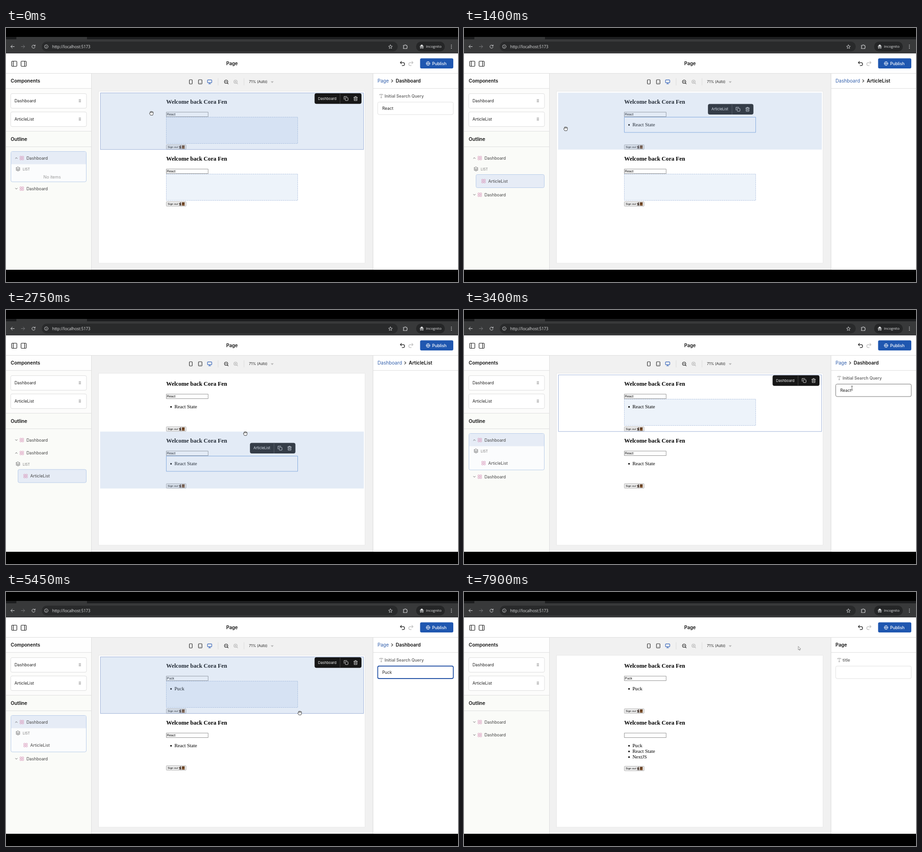
An HTML page with a canvas for the animation above (8.3 s loop, 960x540 px).

```html
<!DOCTYPE html>
<html lang="en">
<head>
<meta charset="utf-8">
<title>Page editor</title>
<style>
html, body { margin: 0; width: 100%; height: 100%; overflow: hidden; background: #000; }
canvas { display: block; }
</style>
</head>
<body>
<canvas id="stage" width="960" height="540"></canvas>
<script>
const ctx = document.getElementById('stage').getContext('2d');
const LOOP = 8300, STEP = 50;
const UI = 'Inter, sans-serif', CHROME = '"Open Sans", sans-serif';
const SERIF = '"Liberation Serif", serif', SANS = '"Liberation Sans", sans-serif';
const BLUE = '#1f57b0', ROW = 121;
const ARTICLES = ['Puck', 'React State', 'NextJS'];

// Cursor way points: time, x, y
const PATH = [
  [0, 309, 181], [250, 95, 200], [300, 89, 205], [550, 400, 226], [600, 414, 222],
  [750, 414, 222], [1100, 410, 216], [1400, 216, 214], [1550, 100, 206], [1650, 89, 205],
  [2050, 380, 347], [2200, 414, 340], [2400, 416, 338], [2600, 416, 338], [2850, 570, 212],
  [3100, 600, 200], [3300, 766, 172], [3400, 824, 166], [5150, 824, 166], [5450, 624, 257],
  [5600, 520, 295], [5650, 520, 295], [5900, 885, 186], [5950, 889, 188], [6050, 889, 188],
  [6200, 815, 171], [7050, 815, 171], [7350, 710, 116], [8300, 710, 116]
];
// Selection: d = dashboard, a = article list, with the row index
const PICKS = [[0, 'd0'], [300, ''], [800, 'a0'], [1650, ''], [2450, 'a1'],
  [2900, 'd0'], [5600, 'd1'], [7350, '']];
const QUERY = [
  [[0, 'React'], [4450, 'P'], [4550, 'Pu'], [4650, 'Puc'], [4750, 'Puck']],
  [[0, 'React'], [6700, '']]
];

const within = (t, a, b) => t >= a && t < b;
const latest = (list, t) => list.filter(k => k[0] <= t).pop()[1];

function cursorAt(t) {
  const i = Math.max(1, PATH.findIndex(p => p[0] > t));
  const [t0, x0, y0] = PATH[i - 1], [t1, x1, y1] = PATH[i];
  const k = (t - t0) / (t1 - t0);
  return { x: x0 + (x1 - x0) * k, y: y0 + (y1 - y0) * k };
}

function text(s, x, cy, size, color = '#222', weight = 400, font = UI) {
  ctx.font = `${weight} ${size}px ${font}`;
  ctx.fillStyle = color;
  ctx.fillText(s, x, cy + size * .36);
  return ctx.measureText(s).width;
}
function fill(x, y, w, h, color) {
  ctx.fillStyle = color;
  ctx.fillRect(x, y, w, h);
}
function box(x, y, w, h, r, bg, edge, lw = 1) {
  ctx.beginPath();
  ctx.roundRect(x, y, w, h, r);
  if (bg) { ctx.fillStyle = bg; ctx.fill(); }
  if (edge) { ctx.strokeStyle = edge; ctx.lineWidth = lw; ctx.stroke(); }
}
function icon(x, y, d, color, lw = 1, bg) {
  const p = new Path2D(d);
  ctx.save();
  ctx.translate(x, y);
  ctx.lineCap = ctx.lineJoin = 'round';
  if (bg) { ctx.fillStyle = bg; ctx.fill(p); }
  ctx.strokeStyle = color;
  ctx.lineWidth = lw;
  ctx.stroke(p);
  ctx.restore();
}
function disc(x, y, r, color) {
  ctx.beginPath();
  ctx.arc(x, y, r, 0, 7);
  ctx.fillStyle = color;
  ctx.fill();
}
const ring = r => `M${r} 0A${r} ${r} 0 1 1 ${-r} 0A${r} ${r} 0 1 1 ${r} 0`;

function browser() {
  fill(0, 0, 960, 540, '#000');
  fill(0, 19, 960, 35, '#38393a');
  fill(172, 19, 788, 5, '#1d1e1f');
  fill(0, 19, 22, 5, '#1d1e1f');
  box(76, 29, 756, 21, 10.5, '#292a2b');
  box(871, 29, 61, 21, 10.5, '#252627');
  icon(14, 39.5, 'M3.7 0H-3.7M-.5-3.3L-3.8 0L-.5 3.3', '#d5d6d8');
  icon(36, 39.5, 'M-3.7 0H3.7M.5-3.3L3.8 0L.5 3.3', '#77787a');
  icon(58.5, 39.5, 'M3 -1.5A3.4 3.4 0 1 0 3.2 1.3M3.4-3.6V-1.3H1', '#d5d6d8');
  icon(85.5, 39.5, ring(3.7) + 'M0 0V1.8M0-1.7V-1.6', '#d5d6d8', .9);
  text('http://localhost:5173', 98, 40, 8.4, '#e0e1e2', 400, CHROME);
  icon(816.5, 39.8, 'M0-4L1.2-1.3L4-1L1.9 .9L2.5 3.7L0 2.2L-2.5 3.7L-1.9 .9L-4-1L-1.2-1.3Z', '#d5d6d8', .9);
  icon(848, 39.8, 'M-4-2.8H-1.3A1.3 1.3 0 0 1 1.3-2.8H3.5V-.8A1.4 1.4 0 0 1 3.5 1.8V4H-4V1.8A1.4 1.4 0 0 0-4-.8Z', '#d5d6d8', 1.1);
  icon(883, 39.5, 'M-4-.5H4M-2.3-1L-1.4-3.5H1.4L2.3-1Z', '#e4e5e6', 1, '#e4e5e6');
  icon(881, 42, ring(1.3), '#e4e5e6', .9);
  icon(885, 42, ring(1.3), '#e4e5e6', .9);
  text('Incognito', 892, 39.7, 7.6, '#e4e5e6', 400, CHROME);
  for (const y of [36.3, 39.6, 42.9]) disc(946, y, .9, '#d5d6d8');
}

function chrome() {
  fill(0, 54, 960, 460, '#fff');
  fill(181, 97, 599, 417, '#f1f1f1');
  fill(0, 97, 181, 417, '#fcfcfb');
  fill(0, 220, 181, 294, '#fafbf8');
  fill(0, 97, 181, 31, '#fefefe');
  fill(0, 96, 960, 1, '#dedede');
  for (const y of [128, 219, 252]) fill(0, y, 181, 1, '#e0e0e0');
  fill(181, 97, 1, 417, '#dedede');
  fill(779, 97, 1, 417, '#dcdcdc');
  fill(780, 128, 180, 1, '#e0e0e0');
  box(196.5, 134.5, 566, 365.5, 0, '#fff', '#e8e8e8');

  for (const [x, d] of [[17.5, -2], [37.5, 2]]) {
    box(x - 5.5, 70.5, 11, 11, 1.5, null, '#222', 1.2);
    icon(x, 76, `M${d}-5.5V5.5`, '#222', 1.2);
  }
  ctx.textAlign = 'center';
  text('Page', 480, 75.3, 10.1, '#111', 600);
  ctx.textAlign = 'left';
  icon(842, 75.5, 'M-2-4.5L-4.6-1.9L-2 .7M-4.6-1.9H1.5A3 3 0 0 1 1.5 4.3H-.8', '#222', 1.2);
  icon(860, 75.5, 'M2-4.5L4.6-1.9L2 .7M4.6-1.9H-1.5A3 3 0 0 0-1.5 4.3H.8', '#bdbdbd', 1.2);
  box(879.5, 64.5, 70.5, 21.5, 3, BLUE);
  icon(896.5, 75.5, ring(4) + 'M-4 0H4M0-4C-2.3-1.5-2.3 1.5 0 4C2.3 1.5 2.3-1.5 0-4', '#fff', .8);
  text('Publish', 905, 75.4, 8.8, '#fff', 500);

  box(389.5, 110, 6, 9, 1.2, null, '#333', 1.2);
  box(408.8, 110, 7.4, 9, 1.2, null, '#333', 1.2);
  icon(412.5, 117, 'M-.4 0H.4', '#333', .9);
  box(428, 110.3, 9, 6, 1, null, '#3a68bd', 1.2);
  icon(432.5, 118.8, 'M-2.2 0H2.2M0-2V0', '#3a68bd', 1.1);
  for (const x of [450, 505]) fill(x, 107, 1, 15, '#dcdcdc');
  for (const [x, c, d] of [[467.5, '#222', ''], [487.5, '#b5b5b5', 'M0-1.6V1.6']])
    icon(x, 114.3, ring(3.5) + 'M2.6 2.6L4.5 4.5M-1.6 0H1.6' + d, c, 1.1);
  text('71% (Auto)', 516, 114.6, 7.6, '#222');
  icon(565.5, 115, 'M-2.5-1.3H2.5L0 1.5Z', '#b5b5b5', .5, '#b5b5b5');

  text('Components', 10, 112.5, 10.1, '#111', 600);
  text('Outline', 10, 236, 10.1, '#111', 600);
  card('Dashboard', 10, 139);
  card('ArticleList', 10, 178);
}

function card(name, x, y, lifted) {
  box(x, y + .5, 161, 31, 3, '#fff', lifted ? '#eeeeee' : '#dedede');
  text(name, x + 8, y + 16, 8.8, '#222');
  for (let i = 0; i < 6; i++)
    disc(x + 145.6 + (i % 2) * 2.5, y + 13.3 + (i >> 1) * 2.4, .75, '#555');
}

function chevron(x, y, up) {
  icon(x, y, up ? 'M-2 1L0-1L2 1' : 'M-2-1L0 1L2-1', '#555', .9);
}
function outlineRow(name, x, y) {
  for (let i = 0; i < 4; i++)
    box(x - 3.8 + (i % 2) * 4.4, y - 3.8 + (i >> 1) * 4.4, 3.2, 3.2, .5, null, '#d793b8', .9);
  text(name, x + 10, y, 8.8, '#444');
}

function outline(pick, lists) {
  let y = 276.5;
  for (let i = 0; i < 2; i++) {
    const open = pick[1] === String(i), on = pick === 'd' + i, full = lists[i];
    const h = open ? (full ? 78 : 65) : 27.5;
    if (on) {
      box(10.5, y - 14, 160, h - .5, 3, '#fbfcfd', '#b9cdea');
      box(11, y - 13.5, 159, 26.5, [3, 3, 0, 0], '#e6ecf6');
    }
    chevron(22, y, open);
    outlineRow('Dashboard', 33.5, y);
    if (open) {
      icon(25.5, y + 23, 'M0-4L4.2-1.8L0 .4L-4.2-1.8ZM-4.2 .4L0 2.6L4.2 .4M-4.2 2.4L0 4.6L4.2 2.4', '#666', .9);
      text('LIST', 35.5, y + 24.2, 7.2, '#777');
      if (full) {
        if (pick[0] === 'a') box(25.5, y + 35, 145, 28, 3, '#e6ecf6', '#b9cdea');
        outlineRow('ArticleList', 41.5, y + 49);
      } else text('No items', 79.5, y + 40.5, 8.8, '#999');
    }
    y += h;
  }
}

function crumbs(parent, name) {
  let x = 789;
  if (parent) {
    x += text(parent, x, 112.5, 10.1, '#3461ad');
    icon(x + 7, 112.5, 'M-1.4-2.6L1.3 0L-1.4 2.6', '#333', 1.2);
    x += 14.5;
  }
  text(name, x, 112.5, 10.1, '#111', 600);
}

function panel(t, pick, query, cur) {
  if (pick[0] === 'a') return crumbs('Dashboard', 'ArticleList');
  crumbs(pick && 'Page', pick ? 'Dashboard' : 'Page');
  icon(797, 144.5, 'M-3.4-2V-3.5H3.4V-2M0-3.5V3.7M-1.4 3.7H1.4', '#999', .9);
  text(pick ? 'Initial Search Query' : 'title', 804, 144.5, 8.8, '#6e6e6e', 600);
  const focus = within(t, 3600, 5600) || within(t, 6200, 7350);
  const edge = focus ? '#2a57a8' : inField(cur) ? '#777' : '#e0e0e0';
  box(789.5, 157.5, 160.5, 26.5, 3, '#fff', edge, focus ? 1.8 : 1);
  if (!pick) return;
  if (within(t, 3800, 4450) || within(t, 6400, 6700)) fill(798, 164, 25, 12, '#b4d2f7');
  text(query[pick[1]], 799, 170.5, 8.8, '#222');
}

const inField = c => c.x > 789 && c.x < 950 && c.y > 157 && c.y < 184;

function signOut(y) {
  box(340.5, y + .5, 42, 9.5, 1, '#efefef', '#a9a9a9', .9);
  text('Sign out', 343.3, y + 5.2, 6, '#000', 400, SANS);
  disc(370.6, y + 2.7, 1, '#35251d');
  icon(370, y + 5.5, 'M.2-1.7L-.4 .6L1.4 1.8L1 3.3M-.4 .6L-1.6 2.6M-2.4-1L-.4-1.4L1.6-.2', '#35251d', 1.3);
  fill(373.5, y + 1.8, 6, 7, '#754927');
  fill(374.7, y + 2.8, 1.4, 2.1, '#4b2c17');
  fill(376.9, y + 2.8, 1.4, 2.1, '#4b2c17');
  disc(378.3, y + 6, .5, '#d7b268');
}

function slot(y, h, target) {
  fill(340, y + 189, 280, h, 'rgba(220,231,246,.5)');
  if (target) fill(340, y + 189, 280, 22, '#c6d6eb');
  ctx.setLineDash(target ? [3, 1.6] : [2.5, 1.5]);
  box(340.5, y + 189.5, 279, h - 1, 0, null, target ? '#5674c4' : '#b4c5e0');
  ctx.setLineDash([]);
}

function toolbar(name, right, y) {
  ctx.font = `500 7.6px ${UI}`;
  const x = right - 60 - ctx.measureText(name).width;
  box(x, y, right - x, 22.5, 4, '#171717');
  text(name, x + 7.3, y + 11.2, 7.6, '#eee');
  fill(right - 46, y, 1, 22.5, '#444');
  box(right - 34.5, y + 9.5, 6, 6, 1, null, '#e2e2e2', .9);
  icon(right - 33, y + 11, 'M-4 2V-4H2', '#e2e2e2', .9);
  icon(right - 12.5, y + 11.3, 'M-4-2.6H4M-1.5-2.8V-4.2H1.5V-2.8M-3-2.6V4.2H3V-2.6M-1-.6V2.2M1-.6V2.2', '#e2e2e2', .9);
}

function dashboard(i, s) {
  const y = i * ROW, rows = s.lists[i] ? ARTICLES.filter(a => a.includes(s.query[i])) : [];
  const grow = rows.length > 2 ? 1.2 : 0;
  const picked = s.pick === 'd' + i, child = s.pick === 'a' + i, target = s.target === i;
  text('Welcome back Cora Fen', 340.3, y + 156.8, 12.35, '#000', 700, SERIF);
  box(340.5, y + 178.9, 88.8, 9.6, 0, '#fff', '#8b8b8b', .9);
  text(s.query[i], 341.8, y + 183.8, 6.9, '#000', 400, SANS);
  if (target || !s.lists[i] || picked) slot(y, 57 + grow, target);
  rows.forEach((name, n) => {
    disc(350.5, y + 206 + n * 12, 1.7, '#000');
    text(name, 357.7, y + 205.4 + n * 12, 10.6, '#000', 400, SERIF);
  });
  signOut(y + 247.8 + grow);
  if (child) box(340.5, y + 189.5, 279, 32.5, 0, null, '#83abe0');
  if (child) toolbar('ArticleList', 614.7, y + 161.5);
  if (s.hover === 'd' + i) fill(200, y + 137.5, 560, 121 + grow, 'rgba(143,175,219,.25)');
  if (s.hover === 'a' + i) fill(340, y + 189, 280, 33, 'rgba(143,175,219,.25)');
  if (picked || target)
    box(200.5, y + 138, 559, 120.3 + grow, 0, null, target ? '#dadada' : '#a3b5da');
}

function pointer(c, dragging) {
  const onPage = c.x > 200 && c.x < 760 && c.y > 137 && c.y < 379;
  const onCard = c.x > 10 && c.x < 171 && c.y > 178 && c.y < 210;
  if (dragging || onPage || onCard)
    icon(c.x, c.y, 'M-2.4 4L-4.3 .6Q-4.4-.8-2.9 0V-2.8Q-2.2-4-1.4-3Q-.6-4.7 .4-3.2Q1.4-4.2 2.1-2.7Q3.4-3.3 3.7-1.8V1.2L2.7 4Z'
      + 'M-1.4-2.8V-.9M.4-3V-.9M2.1-2.5V-.9', '#333', .9, '#fff');
  else if (inField(c))
    icon(c.x, c.y, 'M-1.6-4.5Q0-4.5 0-3.6Q0-4.5 1.6-4.5M0-3.6V3.6M-1.6 4.5Q0 4.5 0 3.6Q0 4.5 1.6 4.5', '#333', .8);
  else
    icon(c.x, c.y, 'M0 0V7L1.6 5.6L2.7 8L3.8 7.5L2.8 5.2H4.8Z', '#666', .7, '#fff');
}

function hoverAt(c, lists) {
  if (c.x < 200 || c.x > 760 || c.y < 137 || c.y > 379) return '';
  const i = c.y < 258 ? 0 : 1, dy = c.y - i * ROW;
  const inList = lists[i] && c.x > 340 && c.x < 620 && dy > 189 && dy < 222;
  return (inList ? 'a' : 'd') + i;
}

function draw(t) {
  const cur = cursorAt(t);
  const lists = [t >= 800, t >= 2450];
  const dragging = within(t, 300, 800) || within(t, 1650, 2450);
  const s = {
    lists,
    pick: latest(PICKS, t),
    query: QUERY.map(q => latest(q, t)),
    hover: dragging ? '' : hoverAt(cur, lists),
    target: dragging && cur.x > 300 ? (t < 1000 ? 0 : 1) : -1
  };
  browser();
  chrome();
  outline(s.pick, lists);
  panel(t, s.pick, s.query, cur);
  dashboard(0, s);
  dashboard(1, s);
  if (s.pick === 'd0') toolbar('Dashboard', 755, 138.7);
  if (s.pick === 'd1') toolbar('Dashboard', 755, 230.7);
  if (dragging) card('ArticleList', cur.x - 78.8, cur.y - 27.2, true);
  pointer(cur, dragging);
}

const start = performance.now();
function tick() {
  const t = (performance.now() - start) % LOOP;
  draw(Math.floor(t / STEP) * STEP);
  requestAnimationFrame(tick);
}
tick();
</script>
</body>
</html>
```
